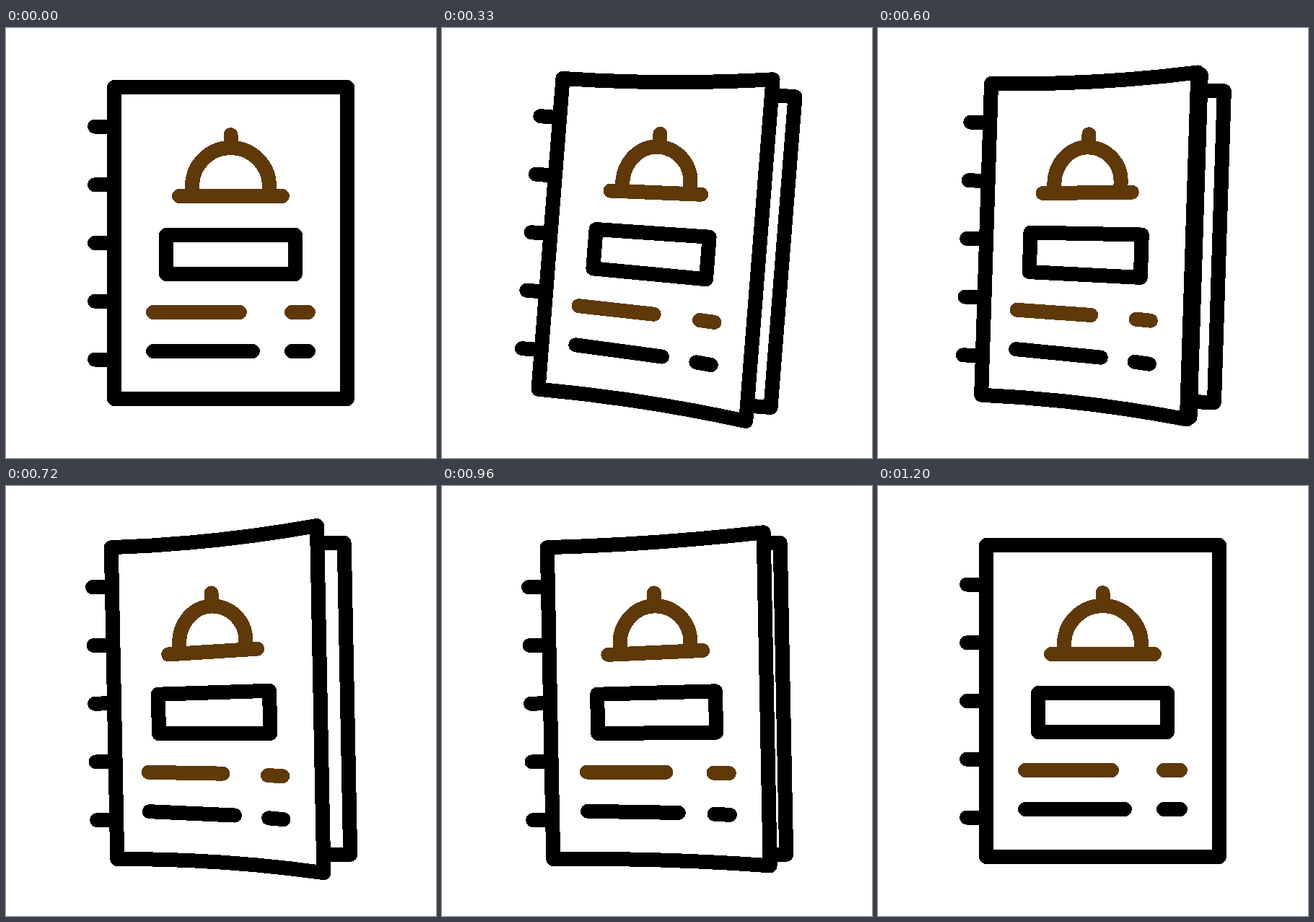
An HTML page that plays this animation: 596x596 px, repeating every 1.29 s.

```html
<!DOCTYPE html>
<html lang="en">
<head>
<meta charset="utf-8">
<title>Menu book</title>
<style>
  html, body { margin: 0; width: 100%; height: 100%; overflow: hidden; background: #fff; }
  svg { display: block; width: 100%; height: 100%; }
  path { fill: none; stroke: #000; stroke-width: 20; stroke-linecap: round; stroke-linejoin: round; shape-rendering: crispEdges; }
  .sheet { fill: #fff; }
  .brown { stroke: #603909; }
</style>
</head>
<body>
<svg viewBox="0 0 596 596">
  <g id="book">
    <path id="rings"/>
    <path id="back" class="sheet"/>
    <path id="inner" class="sheet"/>
    <path id="cover" class="sheet"/>
    <path id="dome" class="brown"/>
    <path id="label"/>
    <path id="rowA" class="brown"/>
    <path id="rowB"/>
  </g>
</svg>
<script>
const LOOP = 1290, STEP = 30, REST = 1200;
const LEFT = 150, RIGHT = 473, TOP = 82, BOTTOM = 514, CX = 311.5, CY = 298;
const TILT = 4.8, LEAN = -1.12, OPEN = 37.3, FLARE = 0.66;

const el = id => document.getElementById(id);
const draw = (id, d) => el(id).setAttribute('d', d);
const fmt = (x, y) => x.toFixed(2) + ' ' + y.toFixed(2);

// Smooth progress from 0 to 1 between two times
function ease(t, from, to) {
  const p = Math.min(1, Math.max(0, (t - from) / (to - from)));
  return (1 - Math.cos(Math.PI * p)) / 2;
}

function angleAt(t) {
  return TILT * ease(t, 54, 382)
    + (LEAN - TILT) * ease(t, 480, 720)
    - LEAN * ease(t, 960, 1185);
}

// Sheet hinged on the left; its free edge moves in and flares towards the viewer
function sheet(open) {
  const x = RIGHT - open, rise = open * FLARE, mid = (LEFT + x) / 2, bend = rise * 0.08;
  return `M${fmt(LEFT, TOP)}Q${fmt(mid, TOP - bend)} ${fmt(x, TOP - rise)}`
    + `L${fmt(x, BOTTOM + rise)}Q${fmt(mid, BOTTOM + bend)} ${fmt(LEFT, BOTTOM)}Z`;
}

// Place of a printed point on the opened cover
function place(x, y, open) {
  const u = (x - LEFT) / (RIGHT - LEFT);
  const dx = open * (1.32 * u - 0.15 * u ** 3);
  const dy = open * FLARE * 1.35 * u ** 1.75 * (y - CY - 11) / 216;
  return [x - dx, y + dy];
}

function domePath(open) {
  const at = (x, y) => place(x, y, open);
  const a = at(240, 233), b = at(383, 233);
  const footL = at(258, 231), footR = at(365, 231);
  const l = at(258, 219.5), r = at(365, 219.5);
  const x = at(CX, 166)[0], top = 166, k = 0.5523;
  return `M${fmt(...a)}L${fmt(...b)}M${fmt(...footL)}L${fmt(...l)}`
    + `C${fmt(l[0], l[1] + (top - l[1]) * k)} ${fmt(x + (l[0] - x) * k, top)} ${fmt(x, top)}`
    + `C${fmt(x + (r[0] - x) * k, top)} ${fmt(r[0], r[1] + (top - r[1]) * k)} ${fmt(...r)}`
    + `L${fmt(...footR)}M${fmt(x, top)}L${fmt(x, 148)}`;
}

function render(t) {
  const close = 1 - ease(t, 840, 1120);
  const open = OPEN * ease(t, 107, 396) * close;
  const inner = OPEN * ease(t, 370, 667) * close;
  const at = (x, y) => fmt(...place(x, y, open));
  const row = (y, end) => `M${at(204, y)}L${at(end, y)}M${at(396, y)}L${at(419, y)}`;

  el('book').setAttribute('transform', `rotate(${angleAt(t).toFixed(3)} ${CX} ${CY})`);
  draw('inner', sheet(inner));
  draw('cover', sheet(open));
  draw('dome', domePath(open));
  draw('label', `M${at(222, 287)}L${at(401, 287)}L${at(401, 341)}L${at(222, 341)}Z`);
  draw('rowA', row(394, 324));
  draw('rowB', row(448, 342));
}

draw('back', sheet(0));
draw('rings', [-2, -1, 0, 1, 2].map(i => `M123 ${CY + i * 80.75}H150`).join(''));

const start = performance.now();
function tick() {
  const t = (performance.now() - start) % LOOP;
  render(Math.min(REST, Math.floor(t / STEP) * STEP));
  requestAnimationFrame(tick);
}
tick();
</script>
</body>
</html>
```
